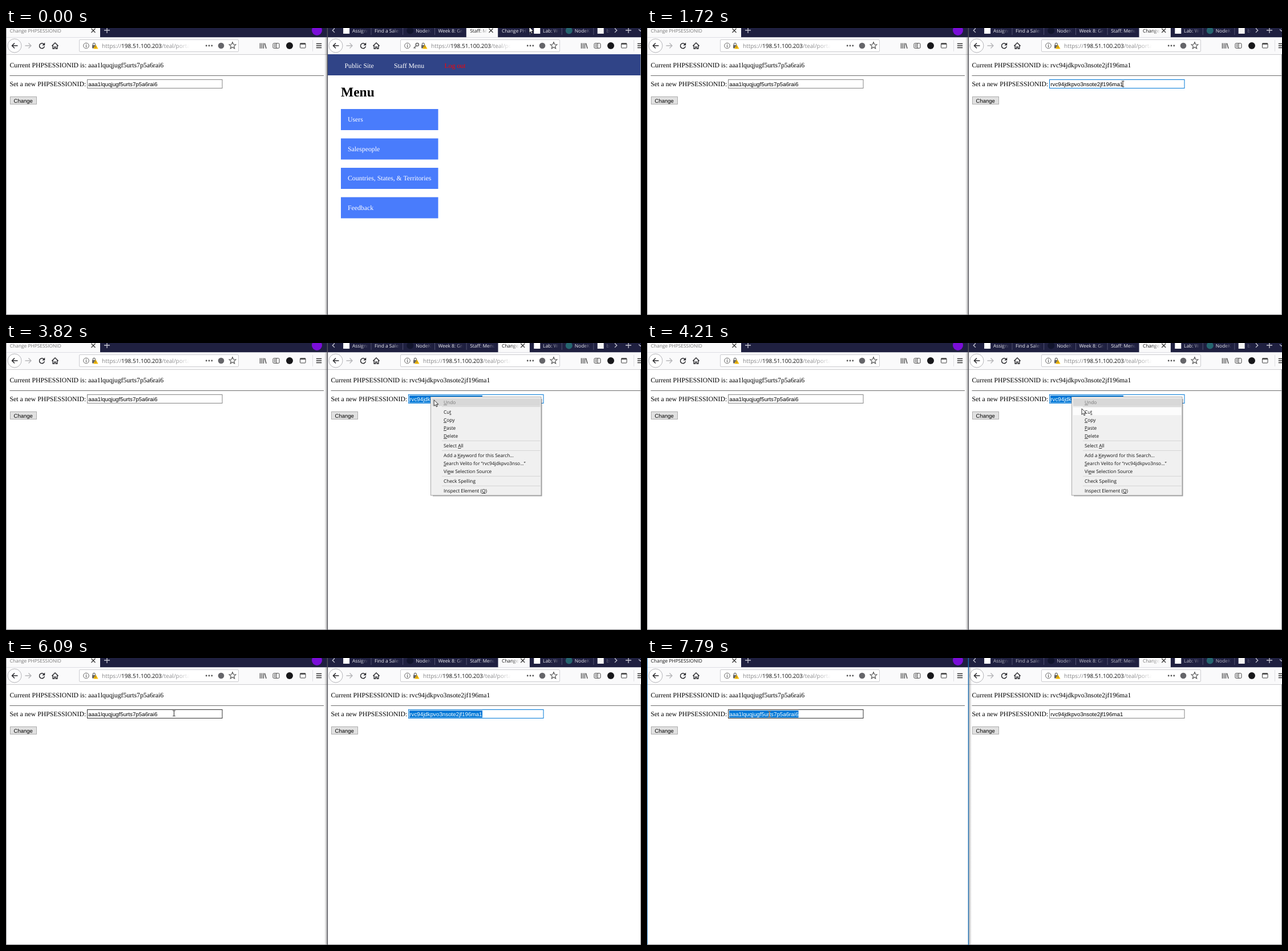
An HTML page that plays this animation: 1113x503 px, repeating every 8 s.

```html
<!DOCTYPE html>
<html lang="en">
<head>
<meta charset="utf-8">
<title>Session change</title>
<style>
html, body { margin: 0; width: 100%; height: 100%; overflow: hidden; background: #fff; }
svg { display: block; width: 1113px; height: 503px; text-rendering: geometricPrecision; }
text { white-space: pre; }
.ui { font-family: "Open Sans", "Noto Sans", sans-serif; }
.page { font-family: "Liberation Serif", serif; }
.form { font-family: "Liberation Sans", sans-serif; }
.key { text-decoration: underline; }
.beam { mix-blend-mode: difference; }
</style>
</head>
<body>
<svg id="stage" viewBox="0 0 1113 503"></svg>
<script>
const LOOP = 8000, STEP = 130, RIGHT = 563, STRIP = 16.5;
const NAVY = '#1f2040', BAR = '#fafafb', INK = '#2a2a2e', BLUE = '#0078d7', EDGE = '#85858a';
const IDS = ['aaa1lquqjugf5urts7p5a6rai6', 'rvc94jdkpvo3nsote2jf196ma1'];
const URL_PARTS = ['https://', '198.51.100.203', '/teal/portal'];

// start, number of steps, end x, end y, pointer kind
const MOVES = [
  [0, 1, 917, -2, 'arrow'], [130, 1, 895, 9, 'arrow'], [540, 1, 896, 9, 'arrow'],
  [810, 7, 843, 98, 'arrow'], [1720, 7, 683, 97, 'beam'], [3030, 3, 748, 97, 'beam'],
  [3820, 4, 762, 115, 'arrow'], [4340, 1, 763, 118, 'arrow'], [4600, 5, 769.5, 133, 'arrow'],
  [5530, 1, 742, 135, 'arrow'], [5660, 1, 560, 130, 'arrow'], [5790, 1, 353.5, 95, 'beam'],
  [5950, 1, 340.5, 96, 'beam'], [6090, 1, 294.5, 97, 'beam'], [6530, 1, 163.5, 106, 'beam'],
  [6670, 1, 140, 109, 'beam'], [6800, 1, 133, 109, 'beam'], [7080, 1, 168.5, 100, 'beam'],
  [7220, 1, 214.5, 99.5, 'beam'], [7380, 1, 214.5, 98.5, 'beam']
];

// label (access key between underscores), baseline
const ITEMS = [
  ['_U_ndo', 107], ['Cu_t_', 124], ['_C_opy', 138], ['_P_aste', 152], ['_D_elete', 166],
  ['Select _A_ll', 183], ['Add a _K_eyword for this Search...', 200],
  ['_S_earch Velito for “rvc94jdkpvo3nso...”', 214], ['Vi_e_w Selection Source', 228],
  ['Check Spellin_g_', 245], ['Inspect Element (_Q_)', 262]
];

// title, favicon colour, favicon shape
const TABS = [
  ['Assignment', '#fff', 'box'], ['Find a Salesperson'], ['NodeKit', '#11142c', 'dot'],
  ['Week 8: Group'], ['Staff: Menu'], ['Change PHPSESSIONID'],
  ['Lab: Work', '#fff', 'box'], ['NodeKit', '#25666f', 'dot'], ['bl', '#f4f4f4', 'box']
];

const rect = (x, y, w, h, fill, more = '') =>
  `<rect x="${x}" y="${y}" width="${w}" height="${h}" fill="${fill}" ${more}/>`;
const frame = (x, y, w, h, color, fill = '#fff', r = 0) =>
  rect(x, y, w, h, fill, `stroke="${color}" rx="${r}"`);
const line = (d, color = INK, w = 1.3) =>
  `<path d="${d}" fill="none" stroke="${color}" stroke-width="${w}"/>`;
const shape = (d, fill) => `<path d="${d}" fill="${fill}"/>`;
const dot = (x, y, r, fill, more = '') => `<circle cx="${x}" cy="${y}" r="${r}" fill="${fill}" ${more}/>`;
const text = (x, y, s, size, cls, fill = '#000', more = '') =>
  `<text x="${x}" y="${y}" font-size="${size}" class="${cls}" fill="${fill}" ${more}>${s}</text>`;
const shift = (x, s) => `<g transform="translate(${x} 0)">${s}</g>`;
const fade = (id, x0, x1, color) =>
  `<linearGradient id="${id}" gradientUnits="userSpaceOnUse" x1="${x0}" x2="${x1}" y1="0" y2="0">
   <stop stop-color="${color}"/><stop offset="1" stop-color="${color}" stop-opacity="0"/></linearGradient>`;
const cross = (x, y, color) => line(`M${x - 3.5} ${y - 3.5}l7 7m0 -7l-7 7`, color, 1.2);
const plus = (x, y) => line(`M${x - 5} ${y}h10M${x} ${y - 5}v10`, '#c9c9d4', 1.3);

function pointer(t) {
  let x = 917, y = -2, kind = 'arrow';
  for (const [start, n, ex, ey, k] of MOVES) {
    if (t < start) break;
    const p = Math.min(n, Math.floor((t - start) / STEP) + 1) / n;
    const e = p * p * (3 - 2 * p);
    x += (ex - x) * e;
    y += (ey - y) * e;
    kind = k;
  }
  if (t < 1720 && y > 91) kind = 'beam';
  return { x, y, kind };
}

function drawPointer({ x, y, kind }) {
  const body = kind === 'arrow'
    ? '<path d="M0 0v10.5l2.5-2.3 1.6 3.8 1.8-.8-1.6-3.6h3.3z" fill="#fff" stroke="#000" stroke-width=".8"/>'
    : line('M-2.3-4.8h1.8l.5.5.5-.5h1.8M0-4.3v8.6M-2.3 4.8h1.8l.5-.5.5.5h1.8', '#eee', 0.9);
  return `<g class="${kind}" transform="translate(${x} ${y})">${body}</g>`;
}

function star(x, y) {
  let d = '';
  for (let i = 0; i < 10; i++) {
    const r = i % 2 ? 2.8 : 6.2, a = i * Math.PI / 5;
    d += (i ? 'L' : 'M') + (x + r * Math.sin(a)).toFixed(2) + ' ' + (y - r * Math.cos(a)).toFixed(2);
  }
  return line(d + 'z', '#555', 1.2);
}

function address(id, keyed, focused) {
  const dx = keyed ? 14 : 0;
  const label = c => URL_PARTS.map((s, i) => `<tspan fill="${c[i]}">${s}</tspan>`).join('');
  let s = frame(128.5, 20.5, 279, 21, focused ? BLUE : '#ccccd0', '#fff', 1.5);
  s += dot(140.5, 31, 4.8, 'none', 'stroke="#666" stroke-width="1"') +
    line('M140.5 30v4M140.5 28v1.2', '#666', 1.2);
  if (keyed) s += dot(157.8, 29, 2.6, 'none', 'stroke="#666" stroke-width="1.5"') +
    line('M156 31l-4.5 4.5m1.5-1.5l1.7 1.7', '#666', 1.5);
  s += shift(dx, rect(151, 30, 6.5, 5.5, '#666') + line('M152.4 30v-1.8a1.9 1.9 0 0 1 3.8 0v1.8', '#666', 1.2) +
    shape('M157.3 29l4.2 7.4h-8.4z', '#ffbf00') + line('M157.3 31.5v2.3m0 .7v1', '#554', 0.9));
  if (focused) {
    s += `<clipPath id="${id}c"><rect x="168" y="24" width="156" height="14"/></clipPath>
      <g clip-path="url(#${id}c)">${rect(168, 24, 156, 14, BLUE)}
      ${text(168, 34.8, label(['#fff', '#fff', '#fff']), 10, 'ui')}</g>`;
    s += line('M331 29.5l3.7 3.7 3.7-3.7', '#555', 1.5);
  } else {
    s += fade(id, 298, 322, '#8a8a8c') +
      text(168 + dx, 34.8, label(['#858587', '#111', `url(#${id})`]), 10, 'ui');
  }
  for (const x of [351.2, 356, 360.8]) s += dot(x, 31, 1.4, '#555');
  return s + dot(377, 31, 5.3, '#66666a') + star(397, 31);
}

function toolbar(id, keyed, focused) {
  return rect(0, STRIP, 563, 46 - STRIP, BAR) + rect(0, 46, 563, 1, '#cccccf') +
    dot(15, 31, 12, '#fff', 'stroke="#b4b4b8"') +
    line('M20.5 31h-10m4.5-4.5l-4.5 4.5 4.5 4.5', INK, 1.5) +
    line('M33.5 31h10.5m-4.5-4.5l4.5 4.5-4.5 4.5', '#b6b6b9', 1.4) +
    line('M66.3 28.2A4.5 4.5 0 1 0 67.4 32.2', INK, 1.5) + shape('M68.2 25.6v4.8h-4.8z', INK) +
    line('M80.4 31.6L86 26l5.6 5.6M82.2 30.5v5.8h2.5v-3.2h2.6v3.2h2.5v-5.8', INK, 1.4) +
    address(id, keyed, focused) +
    line('M445.5 26.5v9.5m3-9.5v9.5m3-9.5v9.5m2-9.2l2.6 9.2', '#444', 1.3) +
    frame(468, 26.8, 11, 8.6, '#444', 'none', 1.5) + line('M474 27v8.2M470 29h2.5m-2.5 2h2.5m-2.5 2h2.5', '#444', 1) +
    dot(497, 31, 6, '#17171a') +
    frame(515.5, 27, 9.5, 8, '#444', 'none', 1) + rect(515.5, 26.5, 9.5, 2.4, '#444') +
    rect(537, 21, 1, 20, '#dedee1') +
    line('M543.8 27.5h9.4m-9.4 3.5h9.4m-9.4 3.5h9.4', '#333', 1.3);
}

function tabStrip(t) {
  const current = t < 540 ? 4 : 5, live = t < 6370;
  let s = rect(564, 0, 549, STRIP, NAVY) + line('M576 .5l-3.7 3.7 3.7 3.7', '#c9c9d4', 1.3);
  TABS.forEach(([title, color, kind], i) => {
    const x = 584.6 + i * 55.7, on = i === current;
    const end = i === 8 ? 1059 : x + (on ? 36 : 50);
    if (on) s += rect(x - 0.6, 0, 55.4, STRIP, BAR);
    else if (i === 5 && t >= 130) s += rect(x, 0, 55, STRIP, '#35365a');
    if (kind === 'box') s += rect(x + 6.5, -1, 11, 11, color);
    if (kind === 'dot') s += dot(x + 12.3, 4.5, 6, color);
    const tone = on ? (live ? '#111' : '#777') : (live ? '#f0f0f5' : '#bdbdc8');
    s += fade('tab' + i, end - 13, end, tone) +
      text(x + (kind ? 22.3 : 5.8), 8, title, 8.4, 'ui', `url(#tab${i})`);
    if (on) s += cross(x + 42.6, 4.5, '#333');
    else if (i !== current - 1 && i < 8) s += rect(x + 55, 0, 0.8, 12, '#5d5e7c');
  });
  return s + line('M1067 .5l3.7 3.7-3.7 3.7', '#c9c9d4', 1.3) + plus(1091, 4) +
    line('M1109 2.5l3 3 3-3', '#c9c9d4', 1.2);
}

function sessionPage(id, border, selFrom) {
  const n = IDS.indexOf(id), end = n ? 272 : 265.5;
  let s = text(6.5, 69.3, 'Current PHPSESSIONID is: ' + id, 11.78, 'page') +
    rect(6.5, 83, 550.5, 1, '#6c6c6c') +
    text(6.5, 102, 'Set a new PHPSESSIONID:', 11.78, 'page') +
    frame(142.5, 90.5, 236.5, 15, border) +
    text(144.3, 101.8, id, 9.78, 'form');
  if (selFrom < end) {
    s += `<clipPath id="sel${n}"><rect x="${selFrom}" y="92" width="${end - selFrom}" height="12.5"/></clipPath>
      <g clip-path="url(#sel${n})">${rect(140, 90, 160, 16, BLUE)}${text(144.3, 101.8, id, 9.78, 'form', '#fff')}</g>`;
  }
  return s + frame(7.5, 120.5, 46, 13, '#adadad', '#e1e1e1') + text(13.6, 130.7, 'Change', 9.5, 'form');
}

function staffPage() {
  let s = rect(564, 46, 549, 37, '#304487') +
    text(593.5, 70, 'Public Site', 11.78, 'page', '#fff') +
    text(680, 70, 'Staff Menu', 11.78, 'page', '#fff') +
    text(768.5, 70, 'Log out', 11.78, 'page', '#f00') +
    text(587, 120, 'Menu', 23.5, 'page', '#000', 'font-weight="bold"');
  ['Users', 'Salespeople', 'Countries, States, &amp; Territories', 'Feedback'].forEach((label, i) => {
    const y = 142 + i * 51.5;
    s += rect(587, y, 170.5, 37, '#497cfc') + text(599, y + 22.4, label, 11.78, 'page', '#fff');
  });
  return s;
}

function contextMenu(t, y) {
  let s = rect(748, 98, 191.5, 170.5, '#000', 'opacity=".4"') +
    frame(744.5, 94.5, 193.5, 172.5, '#a8a8a8', '#f0f0f0');
  if (t < 4340) s += rect(747, 97, 189.5, 13.5, '#d8d8d8');
  if (t >= 4210 && t < 4340) s += rect(747, 113, 189.5, 13.5, '#fcfcfc');
  if (t >= 4340) s += rect(747, y < 127 ? 113.5 : 127.5, 189.5, 14, '#91c9f7');
  for (const ly of [111, 171, 188, 233, 250]) s += rect(764, ly, 172.5, 1, '#d5d5d5');
  ITEMS.forEach(([label, ly], i) => {
    const rich = label.replace(/_(.)_/, '<tspan class="key">$1</tspan>');
    s += text(767, ly, rich, 8.35, 'ui', i ? '#111' : '#777');
  });
  return s;
}

function edges(left) {
  const accent = '#1d70b5';
  return `<linearGradient id="shade" x1="${left ? 0 : 1}" x2="${left ? 1 : 0}">
    <stop stop-opacity=".3"/><stop offset="1" stop-opacity="0"/></linearGradient>` +
    rect(left ? 564 : 558, STRIP, 5, 503 - STRIP, 'url(#shade)') +
    rect(0, 0, 1, 503, left ? accent : '#9a9a9e') +
    rect(0, 502, 1113, 1, EDGE) + rect(1112, 46, 1, 457, EDGE) +
    rect(562.7, 0, 1.4, 503, left ? accent : '#55555c');
}

function scene(t) {
  const p = pointer(t), left = t >= 6370;
  const overRight = t >= 810 && t < 1720 && p.y > 90;
  const rightBorder = t >= 1720 && !left ? BLUE : overRight ? '#333' : '#858585';
  const rightSel = t < 1720 || left ? 999 : t < 2500 ? Math.max(144, p.x - RIGHT) : 144;
  const leftSel = t < 6530 ? 999 : t < 6670 ? 163.5 : 144;
  return rect(0, 0, 1113, 503, '#fff') +
    rect(0, 0, 563, STRIP, NAVY) + rect(0, 0, 165, STRIP, BAR) +
    text(6.8, 8, 'Change PHPSESSIONID', 8.4, 'ui', left ? '#111' : '#777') +
    cross(153, 4.5, '#333') + plus(177, 4) + dot(545, 4, 9, '#7a0ed8') +
    toolbar('urlL', false, false) +
    sessionPage(IDS[0], t >= 5790 ? '#333' : '#858585', leftSel) +
    tabStrip(t) +
    shift(RIGHT, toolbar('urlR', t < 540, t >= 540 && t < 1720)) +
    (t < 540 ? staffPage() : shift(RIGHT, sessionPage(IDS[1], rightBorder, rightSel))) +
    edges(left) +
    (t >= 3820 && t < 5530 ? contextMenu(t, p.y) : '') +
    drawPointer(p);
}

const stage = document.getElementById('stage');
const begin = performance.now();
let last = '';
function tick() {
  const next = scene((performance.now() - begin) % LOOP);
  if (next !== last) stage.innerHTML = last = next;
  requestAnimationFrame(tick);
}
tick();
</script>
</body>
</html>
```
